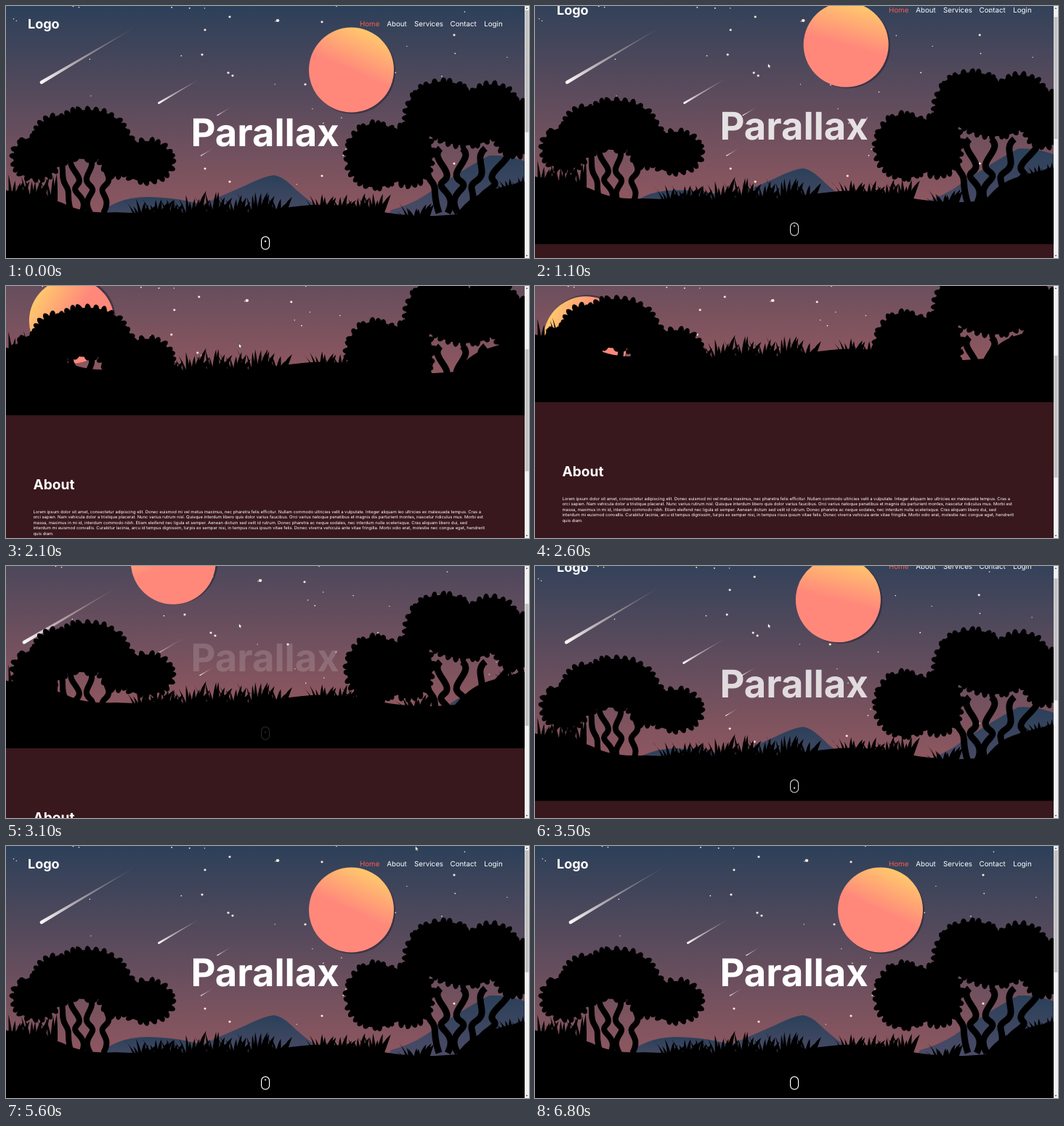
An HTML page for the animation above (7.1 s loop, 720x347 px).

```html
<!DOCTYPE html>
<html lang="en">
<head>
<meta charset="utf-8">
<title>Parallax</title>
<style>
  html, body { margin: 0; width: 100%; height: 100%; overflow: hidden; background: #38171d; }
  svg { display: block; width: 720px; height: 347px; }
  text { font-family: Inter, "Noto Sans", sans-serif; fill: #fff; text-rendering: geometricPrecision; }
  .bold { font-weight: 700; }
  #nav text { font-size: 9.75px; }
  #nav .on { fill: #ff5a4f; }
  #copy text { font-size: 5.85px; }
  .trunk { fill: none; stroke: #000; }
</style>
</head>
<body>
<svg viewBox="0 0 720 347">
  <defs>
    <linearGradient id="skyFill" x2="0" y2="1">
      <stop offset="0" stop-color="#2c4059"/>
      <stop offset=".86" stop-color="#925860"/>
    </linearGradient>
    <linearGradient id="moonFill" x1=".74" y1=".04" x2=".52" y2=".52">
      <stop offset=".1" stop-color="#ffc46e"/>
      <stop offset="1" stop-color="#ff887b"/>
    </linearGradient>
    <linearGradient id="hillFill" x2="0" y2="1">
      <stop offset="0" stop-color="#2b4059"/>
      <stop offset="1" stop-color="#504d68"/>
    </linearGradient>
    <linearGradient id="tailFill" x1="0" y1="1" x2="1" y2="0">
      <stop offset="0" stop-color="#fff"/>
      <stop offset=".35" stop-color="#e8dcdc" stop-opacity=".65"/>
      <stop offset="1" stop-color="#e8c8c0" stop-opacity="0"/>
    </linearGradient>
  </defs>

  <rect id="sky" width="714" height="347" fill="url(#skyFill)"/>
  <g id="stars" fill="#ffe9e0"></g>
  <g id="moon">
    <circle cx="477.5" cy="90" r="58.5" fill="#2a2334" opacity=".6"/>
    <circle cx="475.5" cy="88" r="58.5" fill="url(#moonFill)"/>
  </g>
  <g id="hills" fill="url(#hillFill)">
    <path d="M130 300L140 277Q165 262 198 263Q240 264 275 275L300 300Z"/>
    <path d="M250 300L266 275Q300 260 330 247Q356 234 369 233Q379 234 392 246Q410 264 432 278L450 300Z"/>
    <path d="M520 300L530 281Q556 274 578 260Q620 230 665 206Q690 204 720 216V300Z"/>
  </g>
  <g id="trees"></g>
  <g id="ground">
    <path d="M0 254Q60 262 84 274T150 284Q250 288 340 285Q372 278 420 274Q460 272 500 280Q545 290 590 289L620 287Q636 264 660 256T714 242V347H0Z"/>
  </g>
  <g id="page">
    <rect y="347" width="720" height="400" fill="#38171d"/>
    <text class="bold" x="30" y="31" font-size="18">Logo</text>
    <g id="nav"></g>
    <text class="bold" x="37.5" y="449" font-size="19.1">About</text>
    <g id="copy"></g>
    <g id="wheel">
      <rect x="351.6" y="317.6" width="11" height="17.6" rx="5.5" fill="none" stroke="#fff" stroke-width="1.2"/>
      <circle id="dot" cx="357.1" r="1.2" fill="#fff"/>
    </g>
  </g>
  <text id="title" class="bold" x="356.6" y="193" font-size="52.5" text-anchor="middle">Parallax</text>
  <path id="cursor" d="M0 0V6.4L1.5 5.2L2.6 7.6L3.6 7.1L2.6 4.8H4.6Z" fill="#fff" stroke="#222" stroke-width=".5"/>
  <g>
    <rect x="714" width="6" height="347" fill="#f1f1f1"/>
    <path d="M715.6 4L717 2L718.4 4ZM715.6 343L717 345L718.4 343Z" fill="#555"/>
    <rect id="thumb" x="714.6" y="6" width="4.8" height="168" fill="#c1c1c1"/>
  </g>
</svg>
<script>
const $ = id => document.getElementById(id);

function add(parent, tag, attrs, text) {
  const el = document.createElementNS('http://www.w3.org/2000/svg', tag);
  for (const k in attrs) el.setAttribute(k, attrs[k]);
  if (text) el.textContent = text;
  parent.appendChild(el);
}

function seeded(seed) {
  return () => (seed = (seed * 16807) % 2147483647) / 2147483647;
}

// Sky: a few bright stars, scattered faint ones, meteors
function star(x, y, r) {
  add($('stars'), 'ellipse', { cx: x, cy: y, rx: r, ry: r * .9 });
}
[[374, 20], [308, 15], [435, 22], [274, 33], [270, 67], [312, 96], [306, 92], [412, 108],
 [617, 40], [274, 224], [308, 242], [435, 234], [617, 217]]
  .forEach(([x, y], i) => star(x, y, i ? 1.6 : 2.3));
const skyRnd = seeded(77);
for (let i = 0; i < 42; i++) star(10 + skyRnd() * 690, skyRnd() ** 1.3 * 255, .7 + skyRnd() * .3);

function meteor(x, y, length, w) {
  const angle = -30.5 * Math.PI / 180;
  const nx = Math.sin(angle) * w, ny = -Math.cos(angle) * w;
  add($('stars'), 'path', {
    d: `M${x + nx} ${y + ny}L${x + length * Math.cos(angle)} ${y + length * Math.sin(angle)}` +
       `L${x - nx} ${y - ny}A${w} ${w} 0 0 1 ${x + nx} ${y + ny}Z`,
    fill: 'url(#tailFill)'
  });
}
meteor(49, 105, 156, 2.4);
meteor(210.5, 133.5, 72, 1.4);
meteor(291, 150.5, 25, .7);
meteor(268.5, 206, 22, .7);

// Trees: round lobes ringed with leaves, on S-shaped trunks
function lobe(cx, cy, rx, ry) {
  const rnd = seeded(cx * 31 + cy);
  const n = Math.round(Math.PI * (rx + ry) / 9.5);
  add($('trees'), 'ellipse', { cx, cy, rx, ry });
  for (let i = 0; i < n; i++) {
    const a = (i + rnd() * .5) / n * Math.PI * 2;
    const turn = a * 180 / Math.PI + rnd() * 40 - 20;
    add($('trees'), 'ellipse', {
      rx: 6 + rnd() * 2, ry: 4.2,
      transform: `translate(${cx + (rx - 1.5) * Math.cos(a)} ${cy + (ry - 1.5) * Math.sin(a)}) rotate(${turn})`
    });
  }
}

function trunk(x0, x1, top, wave, width) {
  const mid = (285 + top) / 2, xm = (x0 + x1) / 2;
  add($('trees'), 'path', {
    class: 'trunk', 'stroke-width': width,
    d: `M${x0} 285C${x0 - wave} ${mid + 14} ${xm + wave} ${mid + 12} ${xm} ${mid}S${x1 + wave} ${top + 14} ${x1} ${top}`
  });
}

[[42, 209, 32, 29], [70, 184, 30, 32], [112, 177, 52, 34], [152, 200, 24, 34], [193, 214, 36, 28]]
  .forEach(l => lobe(...l));
[[90, 74, 8], [104, 92, -12], [116, 114, 14], [134, 140, -14]]
  .forEach(([a, b, wave]) => trunk(a, b, 208, wave, 8));

[[509, 206, 40, 44], [555, 205, 32, 42], [575, 150, 24, 32], [602, 132, 42, 28], [632, 154, 58, 38],
 [668, 136, 34, 28], [702, 168, 32, 38]].forEach(l => lobe(...l));
[[596, 574, 10], [608, 598, -16], [622, 628, 18], [636, 660, -18], [652, 690, 12]]
  .forEach(([a, b, wave]) => trunk(a, b, 196, wave, 9));

// Grass: tufts of blades fanning out from the middle
function grass(x0, x1, base, height, tuft) {
  const rnd = seeded(x0 * 7 + height);
  let d = '';
  for (let x = x0; x < x1; x += 3.6) {
    const lean = (((x - x0) % tuft) / tuft - .5) * 28 + rnd() * 6 - 3;
    const h = height * (.5 + rnd() * .5), w = 2.9;
    d += `M${x - w} ${base + 4}Q${x - w + lean * .1} ${base - h * .5} ${x + lean} ${base - h}` +
         `Q${x + w + lean * .4} ${base - h * .4} ${x + w} ${base + 4}Z`;
  }
  add($('ground'), 'path', { d });
}
grass(-4, 70, 266, 38, 28);
grass(178, 236, 287, 23, 20);
grass(240, 366, 287, 34, 30);
grass(364, 384, 284, 22, 20);
grass(424, 520, 282, 25, 24);
grass(550, 582, 291, 20, 32);
grass(684, 714, 252, 18, 20);

// Text
[['Home', 487], ['About', 524.2], ['Services', 562], ['Contact', 611.6], ['Login', 658.2]]
  .forEach(([label, x], i) => add($('nav'), 'text', { x, y: 27.5, class: i ? '' : 'on' }, label));
[
  'Lorem ipsum dolor sit amet, consectetur adipiscing elit. Donec euismod mi vel metus maximus, nec pharetra felis efficitur. Nullam commodo ultricies velit a vulputate. Integer aliquam leo ultricies ex malesuada tempus. Cras a',
  'orci sapien. Nam vehicula dolor a tristique placerat. Nunc varius rutrum nisl. Quisque interdum libero quis dolor varius faucibus. Orci varius natoque penatibus et magnis dis parturient montes, nascetur ridiculus mus. Morbi est',
  'massa, maximus in mi id, interdum commodo nibh. Etiam eleifend nec ligula et semper. Aenean dictum sed velit id rutrum. Donec pharetra ac neque sodales, nec interdum nulla scelerisque. Cras aliquam libero dui, sed',
  'interdum mi euismod convallis. Curabitur lacinia, arcu id tempus dignissim, turpis ex semper nisi, in tempus risus ipsum vitae felis. Donec viverra vehicula ante vitae fringilla. Morbi odio erat, molestie nec congue eget, hendrerit',
  'quis diam.'
].forEach((line, i) => add($('copy'), 'text', { x: 37.5, y: 481.6 + i * 7.5 }, line));

// Motion
const LOOP = 7100, STEP = 100, MAX_SCROLL = 187;
const clamp = v => Math.min(1, Math.max(0, v));
const move = (id, x, y) => $(id).setAttribute('transform', `translate(${x} ${y})`);

function scrollAt(t) {
  if (t < 1100) return 0;
  if (t < 2600) return Math.min(MAX_SCROLL, 19 + (t - 1100) * .15);
  return Math.max(0, MAX_SCROLL - (t - 2600) * .182);
}

function draw(t) {
  const s = scrollAt(t);
  const fade = clamp(1 - s / 113);
  move('sky', 0, -s);
  move('stars', -s * .25, 0);
  $('moon').setAttribute('transform', `translate(0 ${-s}) rotate(${-s * .493} 355.5 369)`);
  move('hills', 0, -s * .5);
  move('trees', 0, -s * .67);
  move('ground', 0, -s);
  move('page', 0, -s);
  move('title', 0, -s * .5);
  move('thumb', 0, s * .48);
  $('title').setAttribute('opacity', fade);
  $('wheel').setAttribute('opacity', fade);

  const phase = (t + 400) % 1500;
  $('dot').setAttribute('cy', 322 + 8 * (phase / 1000) ** 1.5);
  $('dot').setAttribute('opacity', clamp(.7 + phase / 1000) * clamp((1200 - phase) / 300));

  // The pointer comes in from the top edge, rests, and leaves the same way
  const near = clamp((t - 300) / 500) - clamp((t - 4600) / 700);
  const shown = (t >= 300 && t < 2200) || (t >= 2700 && t < 5700);
  $('cursor').setAttribute('visibility', shown ? 'visible' : 'hidden');
  move('cursor', 563.5 - 243 * near, 79 * near);
}

const start = performance.now();
function tick() {
  const t = (performance.now() - start) % LOOP;
  draw(Math.floor(t / STEP) * STEP);
  requestAnimationFrame(tick);
}
tick();
</script>
</body>
</html>
```
